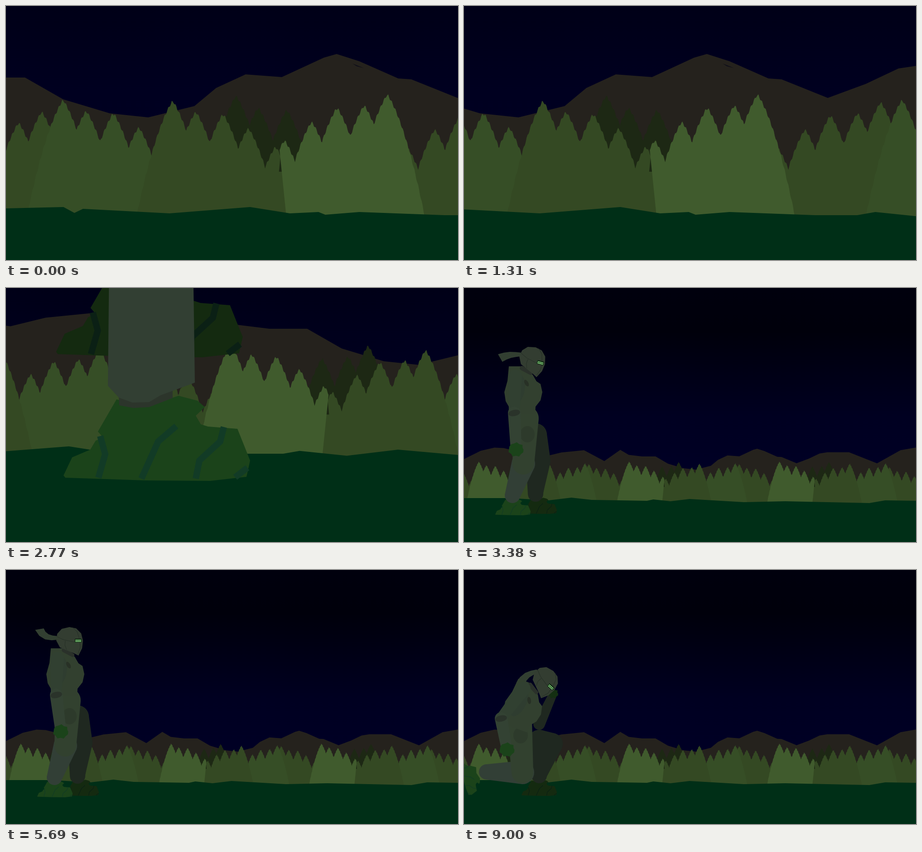
These frames come from a looping animation (998x561 px, 9080 ms). An HTML page with a canvas:

```html
<!DOCTYPE html>
<html>
<head>
<meta charset="utf-8">
<style>
html, body { margin: 0; width: 100%; height: 100%; overflow: hidden; background: #000018; }
canvas { display: block; }
</style>
</head>
<body>
<canvas id="stage" width="998" height="561"></canvas>
<script>
const ctx = document.getElementById('stage').getContext('2d');
const W = 998, H = 561, LOOP = 9080, FRAMES = 118, STEP = LOOP / FRAMES;

const pts = s => s.split(' ').map(p => p.split(',').map(Number));
const clamp = v => Math.min(1, Math.max(0, v));

function trace(p) {
  ctx.beginPath();
  p.forEach(([x, y]) => ctx.lineTo(x, y));
}
function fill(p, color) {
  trace(p);
  ctx.closePath();
  ctx.fillStyle = color;
  ctx.fill();
}
function line(p, color, width) {
  trace(p);
  ctx.strokeStyle = color;
  ctx.lineWidth = width;
  ctx.stroke();
}
function blot(x, y, rx, ry, turn, color) {
  ctx.beginPath();
  ctx.ellipse(x, y, rx, ry, turn, 0, 7);
  ctx.fillStyle = color;
  ctx.fill();
}
function limb([x1, y1], [x2, y2], r1, r2, color) {
  const a = Math.atan2(y2 - y1, x2 - x1), q = Math.PI / 2;
  ctx.beginPath();
  ctx.arc(x1, y1, r1, a + q, a + 3 * q);
  ctx.arc(x2, y2, r2, a - q, a + q);
  ctx.fillStyle = color;
  ctx.fill();
}
function within(matrix, paint) {
  ctx.save();
  ctx.transform(...matrix);
  paint();
  ctx.restore();
}
const turned = (x, y, angle, paint) =>
  within([Math.cos(angle), Math.sin(angle), -Math.sin(angle), Math.cos(angle), x, y], paint);

// --- Landscape ---

const MOUNTAIN = '#25221d', GROUND = '#002f17', FOREST = '#344923';

const hills = pts('-1255,175 -1142,120 -1049,99 -986,102 -880,128 -682,152 -596,131 -443,116 -305,189 -197,114 -140,147 -50,158 42,158 126,206 229,237 314,246 416,221 464,181 529,151 609,157 702,114 730,106 780,122 866,160 895,162 997,203 1081,172 1153,138 1206,130 1352,130 1542,204 1701,116 1806,98');
const ground = pts('0,447 127,444 151,457 170,448 361,458 539,444 627,458 690,455 705,461 780,455 968,462 1062,462 1102,455 1217,467 1342,452 1500,466');
const farGround = pts('0,464 100,464 187,469 237,463 282,468 404,470 418,467 456,471 498,466 618,473 709,471 895,475 930,469 998,470');

const land = (p, color) => fill([...p, [p[p.length - 1][0], 700], [p[0][0], 700]], color);

// Tree line: the highest of several firs at each x, with a ragged edge.
function firs(peaks, from, to, lean) {
  const p = [[from, 490]];
  for (let x = from; x <= to; x += 2) {
    const tops = peaks.map(([px, py]) => {
      const d = Math.max(0, Math.abs(x - px) - 2);
      return py + 1.7 * d + 0.02 * d * d;
    });
    p.push([x, Math.min(...tops) + 3 * Math.sin(x * 0.75)]);
  }
  return [...p, [to - lean, 490]];
}
const clump = firs(pts('368,212 419,236 479,241 535,272 595,313'), 286, 606, 16);
const darkTrees = firs(pts('508,201 557,227 620,232'), 460, 660, 0);
const mirror = (p, sum, dy) => p.map(([x, y]) => [sum - x, y + dy]);
const shift = (p, dx, dy) => p.map(([x, y]) => [x + dx, y + dy]);

function forest(from, to, period) {
  for (let k = from; k <= to; k++) within([1, 0, 0, 1, k * period, 0], () => {
    fill(mirror(clump, 1482, k < 0 ? 24 : 3), FOREST);
    fill(darkTrees, '#1d2814');
    ctx.fillStyle = FOREST;
    ctx.fillRect(300, 366, 600, 124);
    fill(shift(clump, -242, -2), '#364e26');
    fill(clump, FOREST);
    fill(mirror(clump, 1210, -14), '#405b2d');
  });
}

function sky(...colors) {
  const g = ctx.createLinearGradient(0, 0, 0, 380);
  colors.forEach((c, i) => g.addColorStop(i / (colors.length - 1), c));
  ctx.fillStyle = g;
  ctx.fillRect(0, 0, W, H);
}

function pan(n) {
  sky('#000017', '#000020', '#000022');
  within([1, 0, 0, 1, -11.4 * n, 0], () => {
    land(hills, MOUNTAIN);
    fill(pts('765,127 790,137 774,133'), '#0e0e1a');
    forest(-1, 1, 1035);
    land(ground, GROUND);
  });
}

// --- Boots, shared by the close-up and the figure ---

const boot = pts('143,57 102,128 114,142 97,148 85,168 45,185 26,225 30,230 207,236 350,237 430,228 438,192 410,122 345,117 329,112 318,93 338,74 322,60 280,49 210,72');
const straps = ['107,138 118,178 103,230', '275,116 235,150 198,232', '380,118 372,150 326,192 318,232', '432,208 405,229'].map(pts);
const cuff = pts('148,45 149,70 180,76 215,74 267,54 267,30');
const shank = pts('127,-260 124,27 148,53 178,64 215,63 240,48 316,20 312,-260');
const NEAR = { leg: '#323f33', cuff: '#2c352b', boot: '#1b431a', strap: '#123b26' };
const FAR = { leg: '#1f2820', cuff: '#1b211b', boot: '#142a10', strap: '#0b2015' };

function drawBoot(c, strapWidth) {
  fill(boot, c.boot);
  straps.forEach(s => line(s, c.strap, strapWidth));
}
function giantFoot(dx, dy, c) {
  within([1, 0, 0, 1, dx, dy], () => {
    drawBoot(c, 14);
    fill(cuff, c.cuff);
    fill(shank, c.leg);
  });
}
function smallBoot([x, y], angle, c) {
  turned(x, y, angle, () => within([0.19, 0, 0, 0.19, -40, -11], () => drawBoot(c, 6)));
}

function closeUp(n) {
  sky('#000017', '#000020', '#000022');
  within([0.905, 0, 0, 0.908, 627, -53.5], () => land(hills, MOUNTAIN));
  within([-0.908, 0, 0, 0.908, 1260.6, -52.9], () => forest(-1, 1, 1035));
  within([0.905, 0, 0, 0.908, -349, -53.5], () => land(ground, GROUND));
  if (n >= 33) {
    const left = Math.max(0, 42 - n);
    giantFoot(291 - 34.4 * left, 156 - 40 * left, FAR);
  }
  if (n >= 22) {
    const k = Math.min(n, 30) - 26;
    giantFoot(25.25 * k, 47.25 * k, NEAR);
  }
}

// --- Figure: joints standing, kneeling, resting ---

const legJoints = {
  hip: '137,288 126,310 122,330',
  knee: '131,388 128,426 129,447',
  ankle: '107,458 54,442 50,446',
  boot: '104,468 40,445 30,448',
  farHip: '158,324 160,336 166,378',
  farKnee: '167,382 194,378 194,384',
  farAnkle: '158,455 166,454 166,454',
  bootTurn: '0,0 1.24,0 1.3,0'
};
const bodyJoints = {
  back: '99,173 99,213 120,240',
  lean: '0,0 0.16,0 0.35,0',
  shoulder: '113,196 111,238 132,262',
  elbow: '111,276 82,314 82,328',
  hand: '121,357 99,388 95,397',
  farElbow: '140,270 160,320 166,340',
  farHand: '140,340 207,360 197,273',
  head: '141,156 152,207 178,246',
  nod: '0,0 0.44,0 0.73,0',
  bend: '0,0.4 0.05,0.4 -0.3,-0.3'
};

function joints(table, kneel, rest) {
  const out = {};
  for (const name in table) {
    const [a, b, c] = pts(table[name]);
    out[name] = a.map((v, i) => v + (b[i] - v) * kneel + (c[i] - b[i]) * rest);
  }
  return out;
}

const torso = pts('0,0 26,0 41,7 53,19 61,33 70,39 74,57 70,75 59,89 58,105 9,105 -7,77 -10,57 -3,32');
const skull = pts('-30,0 -28,-15 -18,-26 -1,-30 14,-27 25,-16 29,0 27,17 19,33 9,28 -22,15');
const seams = ['-29,-9 -14,-2 10,3', '-10,0 -11,10 -7,20', '6,-29 16,-20 21,-4', '22,4 23,15 18,29'].map(pts);

function fist([x, y], r, color) {
  const p = [];
  for (let a = 0; a < 6.28; a += 0.4) {
    const q = r + 1.5 * Math.sin(a * 7);
    p.push([x + q * 1.1 * Math.cos(a), y + q * Math.sin(a)]);
  }
  fill(p, color);
}

// Headband tail: a widening ribbon that curls away from the knot.
function ribbon(base, curl) {
  const top = [], low = [];
  let x = 0, y = 0;
  for (let i = 0; i < 5; i++) {
    const a = Math.PI + base + curl * Math.max(0, i - 0.5), w = 4 + i * 1.4;
    top.push([x + w * Math.sin(a), y - w * Math.cos(a)]);
    low.unshift([x - w * Math.sin(a), y + w * Math.cos(a)]);
    x += 12 * Math.cos(a);
    y += 12 * Math.sin(a);
  }
  fill([...top, ...low], '#323f31');
}

function drawHead([x, y], angle) {
  turned(x, y, angle, () => {
    fill(skull, '#333d31');
    seams.forEach(s => line(s, '#263027', 1));
    ctx.fillStyle = '#08240c';
    ctx.fillRect(11, -4, 15, 8);
    ctx.fillStyle = '#8fd986';
    ctx.fillRect(12, -2, 13, 1.7);
    ctx.fillRect(12, 1, 13, 1.7);
  });
}

function figure(t) {
  const kneel = clamp((t - 5920) / 1080), rest = clamp((t - 7000) / 1850);
  const lift = 1 - clamp((t - 3380) / 2310);
  const l = joints(legJoints, kneel, clamp((t - 7000) / 920));
  const b = joints(bodyJoints, kneel, rest);
  b.farHand[0] += 36 * Math.sin(Math.PI * rest);
  b.hand[0] -= 6 * lift;
  b.head[0] += 10 * lift;
  b.head[1] += 4 * lift;
  const nod = b.nod[0] + 0.28 * lift;

  limb(b.farElbow, b.farHand, 13, 9, FAR.leg);
  fist(b.farHand, 10, '#142f12');
  smallBoot([162, 465], 0, FAR);
  limb(l.farHip, l.farAnkle, 25, 17, FAR.leg);
  limb(l.farHip, l.farKnee, 25, 24, FAR.leg);
  limb(l.farKnee, l.farAnkle, 24, 16, FAR.leg);
  smallBoot(l.boot, l.bootTurn[0], NEAR);
  limb(l.knee, l.ankle, 26, 17, '#323f36');
  limb(l.hip, l.knee, 28, 24, '#32412f');
  blot(l.hip[0] + 3, l.hip[1] + 35, 16, 18, 0, '#2d3a2b');

  const [hx, hy] = b.head, c = Math.cos(nod), s = Math.sin(nod);
  const knot = [hx - 27 * c + 6 * s, hy - 27 * s - 6 * c];
  within([1, 0, 0, 1, ...knot], () => ribbon(b.bend[0], b.bend[1] - 0.55 * lift));
  turned(...b.back, b.lean[0], () => {
    fill(torso, '#32402f');
    blot(20, 50, 15, 32, 0.15, '#2f3d30');
    blot(39, 37, 4, 8, -0.5, '#283126');
    limb([29, 4], [48, 15], 5, 4, '#2a312a');
  });
  limb(b.shoulder, b.elbow, 15, 12, '#314031');
  limb(b.elbow, b.hand, 14, 12, '#334233');
  blot(...b.elbow, 13, 7, -0.2, '#2a332a');
  fist(b.hand, 15, NEAR.boot);
  drawHead(b.head, nod);
}

function wide(t) {
  sky('#00000d', '#00000b', '#000016', '#000021', '#000024');
  within([0.326, 0, 0, 0.33, 409.3, 319.9], () => land(hills, MOUNTAIN));
  within([-0.327, 0, 0, 0.327, 972, 319.6], () => forest(-1, 2, 1015));
  land(farGround, GROUND);
  figure(t);
}

function draw(time) {
  const n = Math.floor((time % LOOP + 8) / STEP) % FRAMES;
  if (n < 19) pan(n);
  else if (n < 44) closeUp(n);
  else wide(n * STEP);
}

let start;
function tick(now) {
  start ??= now;
  draw(now - start);
  requestAnimationFrame(tick);
}
requestAnimationFrame(tick);
</script>
</body>
</html>
```
